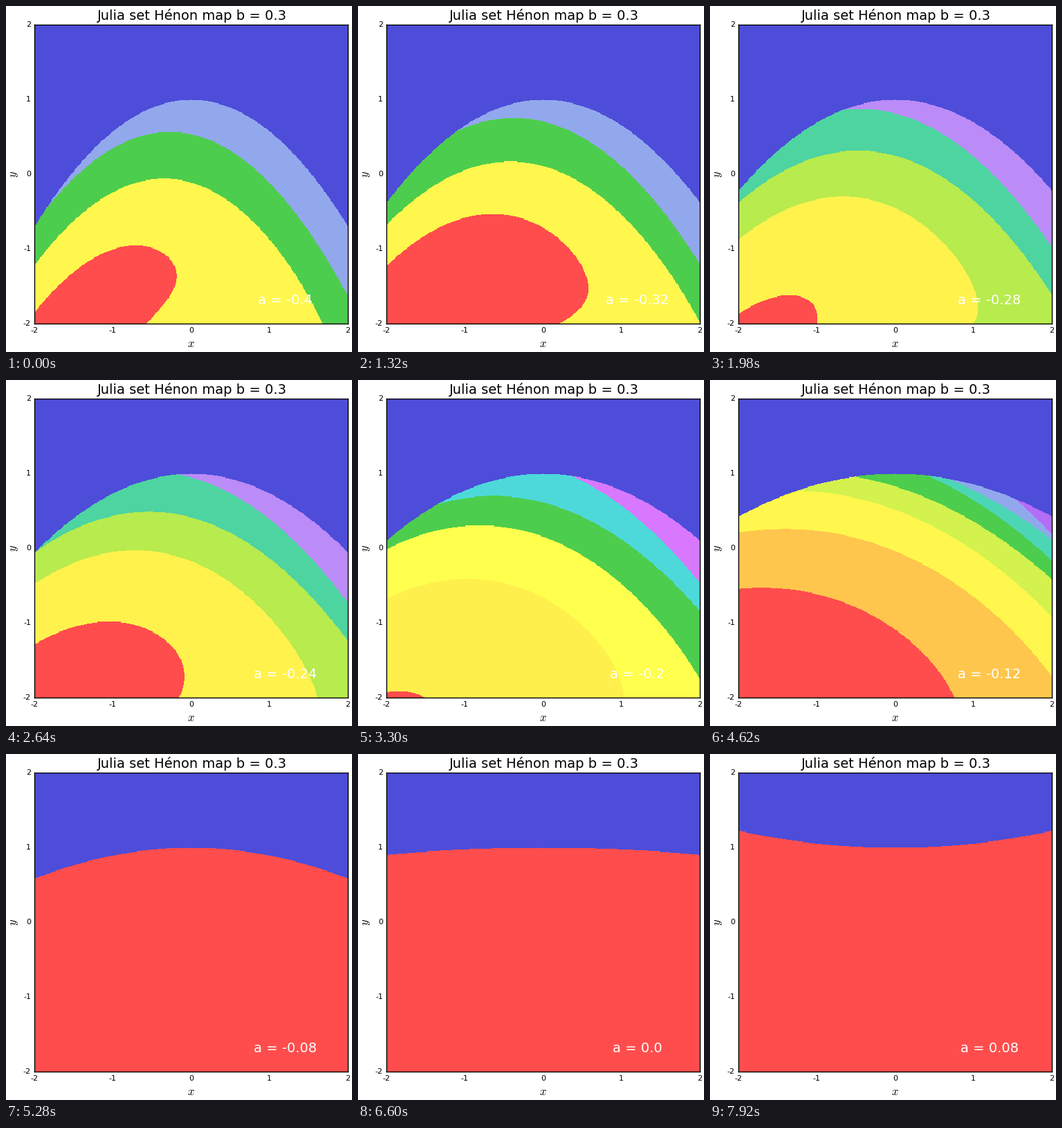
A matplotlib script for the animation above (8000 ms loop, 500 by 500 pixels).

```python
import matplotlib.pyplot as plt
import numpy as np
from matplotlib.animation import FuncAnimation

SIZE = 500
DPI = 100
LEFT, RIGHT, TOP, BOTTOM = 41, 494, 27, 459
SHIFT = 0.35    # offset of the cell grid inside the axes, in pixels
GRID = 401
B = 0.3
MAX_ITER = 60
STEPS = 25
HOLD = 330      # ms per value of a
INTERVAL = 40   # ms per drawn frame
LOOP = 8000

PALETTE = np.array([
    (77, 77, 217), (215, 120, 255), (77, 217, 217), (77, 205, 77),
    (255, 255, 77), (255, 239, 77), (255, 77, 77),
])

plt.rcParams.update({
    "font.family": "DejaVu Sans",
    "mathtext.fontset": "cm",
    "axes.linewidth": 1.0,
    "text.kerning_factor": 6,
})


def escape_times(a):
    """Number of Hénon iterations each start point stays within radius 2."""
    axis = np.round(np.linspace(-2, 2, GRID), 10)
    x, y = np.meshgrid(axis, axis)
    count = np.zeros(x.shape, int)
    alive = np.ones(x.shape, bool)
    for _ in range(MAX_ITER):
        x, y = 1 - a * x**2 + y, B * x
        alive &= x**2 + y**2 <= 4
        count += alive
        x = np.where(alive, x, 0)
        y = np.where(alive, y, 0)
    return count


def colorize(count):
    """Colour the counts, with one extra cell on every side."""
    low, high = count.min(), count.max()
    level = np.pad((count - low) / max(high - low, 1), 1, mode="edge")
    nodes = np.linspace(0, 1, len(PALETTE))
    channels = [np.interp(level, nodes, c) for c in PALETTE.T]
    return np.round(np.stack(channels, axis=-1)).astype(np.uint8)


def label(x, y, text, size, **kw):
    """Text with its baseline at pixel (x, y), y counted from the top."""
    style = {"ha": "center", "va": "baseline", **kw}
    return fig.text(x / SIZE, 1 - y / SIZE, text, fontsize=size, **style)


values = [round(-0.4 + 0.02 * i, 2) + 0.0 for i in range(STEPS)]
images = [colorize(escape_times(a)) for a in values]

width, height = RIGHT - LEFT, BOTTOM - TOP
fig = plt.figure(figsize=(SIZE / DPI, SIZE / DPI), dpi=DPI, facecolor="white")
ax = fig.add_axes([LEFT / SIZE, 1 - BOTTOM / SIZE, width / SIZE, height / SIZE])

half = 2 * (GRID + 2) / GRID
dx, dy = 4 * SHIFT / width, -4 * SHIFT / height
picture = ax.imshow(images[0], origin="lower", interpolation="nearest",
                    aspect="auto",
                    extent=(dx - half, dx + half, dy - half, dy + half))
ax.set(xlim=(-2, 2), ylim=(-2, 2), xticks=[], yticks=[])

label(268.7, 20.4, "Julia set Hénon map b = 0.3", 14)
label(267, 493, "$x$", 12)
label(11, 243, "$y$", 12, va="center", rotation=90)
for k in range(-2, 3):
    part = (k + 2) / 4
    label(LEFT + part * width, 472, str(k), 8)
    label(36, BOTTOM - part * height + 3, str(k), 8, ha="right")
caption = label(403.9, 431, "", 14, color="white")


def update(frame):
    step = min((frame * INTERVAL + INTERVAL - 1) // HOLD, STEPS - 1)
    picture.set_data(images[step])
    caption.set_text(f"a = {values[step]}")
    return picture, caption


anim = FuncAnimation(fig, update, frames=LOOP // INTERVAL, interval=INTERVAL,
                     repeat=True, repeat_delay=0, blit=False)
plt.show()
```
